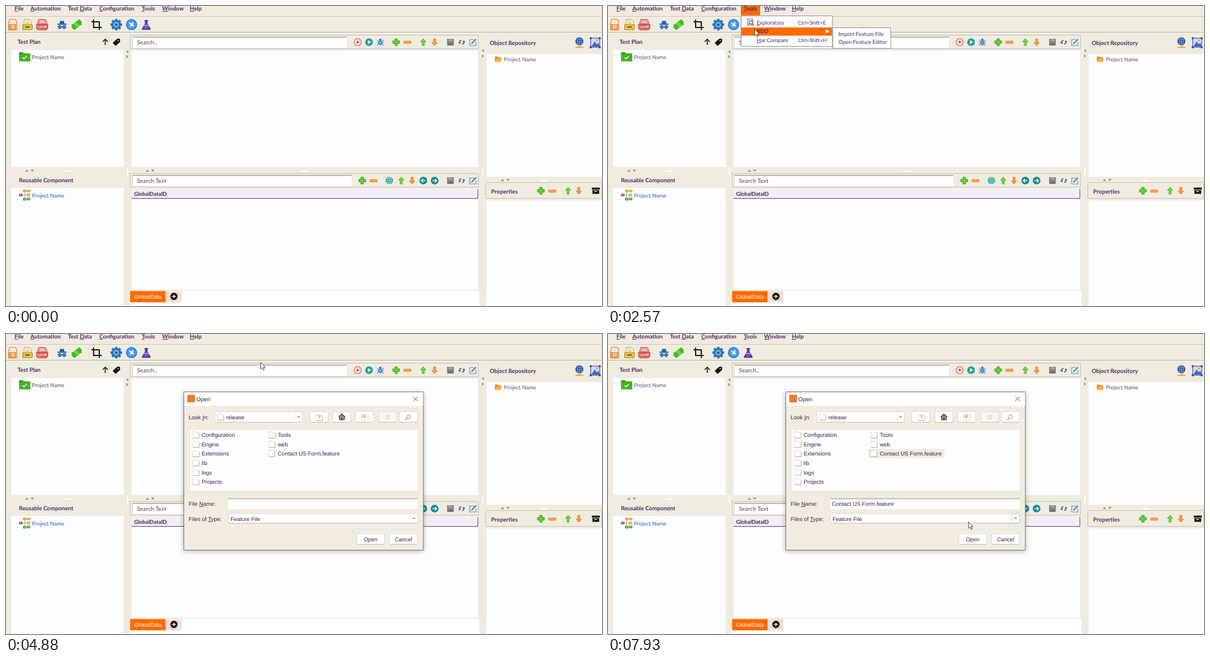
Animation of 1054 by 531 pixels, one loop 8 s. Source, as an HTML page:

```html
<!DOCTYPE html>
<html lang="en">
<head>
<meta charset="utf-8">
<title>Importing a feature file</title>
<style>
html, body { margin: 0; width: 100%; height: 100%; overflow: hidden; background: #f0ebdf; }
svg { display: block; width: 100%; height: 100%; }
text { font-family: Lato, "Open Sans", sans-serif; font-size: 9.6px; fill: #4b2a66; text-rendering: geometricPrecision; white-space: pre; }
.bold { font-weight: 700; font-size: 10.15px; }
.field { font-weight: 500; font-size: 10.3px; fill: #56515c; }
.dlg { font-family: "Liberation Sans", Arial, sans-serif; font-size: 9.87px; fill: #35204f; }
</style>
</head>
<body>
<svg id="stage" viewBox="0 0 1054 531" preserveAspectRatio="none"></svg>
<script>
const LOOP = 8000;
const C = { bg: '#f0ebdf', pane: '#fcfdff', line: '#c3beb2', orange: '#ff6a00', ink: '#4b2a66' };

// ---- drawing helpers ----
const rect = (x, y, w, h, fill, more = '') => `<rect x="${x}" y="${y}" width="${w}" height="${h}" fill="${fill}" ${more}/>`;
const circle = (x, y, r, fill, more = '') => `<circle cx="${x}" cy="${y}" r="${r}" fill="${fill}" ${more}/>`;
const path = (d, fill, more = '') => `<path d="${d}" fill="${fill}" ${more}/>`;
const stroke = (d, color, w = 1, more = '') => path(d, 'none', `stroke="${color}" stroke-width="${w}" ${more}`);
const at = (x, y, body, more = '') => `<g transform="translate(${x} ${y}) ${more}">${body}</g>`;
const group = (id, body) => `<g id="${id}" visibility="hidden">${body}</g>`;
// An underscore marks the underlined letter.
const text = (x, y, s, cls = '', more = '') =>
  `<text x="${x}" y="${y}" class="${cls}" ${more}>${s.replace(/_(.)/, '<tspan text-decoration="underline">$1</tspan>')}</text>`;

// ---- small icons, centred on their position ----
const plus = (x, y) => at(x, y, path('M-2.2-6h4.4v3.8h3.8v4.4h-3.8v3.8h-4.4v-3.8h-3.8v-4.4h3.8z', '#5fd62a', 'stroke="#2f9a1c"'));
const minus = (x, y) => at(x, y, rect(-6.5, -1.8, 13, 4, '#ffa24c', 'rx="1" stroke="#dc7426" stroke-width=".9"'));
const arrow = (x, y, up) => at(x, y, path('M0-6.2 4.8-.8H1.9V6H-1.9V-.8H-4.8Z', up ? '#70dc36' : '#ff9a3c',
  `stroke="${up ? '#3fa822' : '#e07620'}" stroke-width=".9" stroke-linejoin="round"`), up ? '' : 'rotate(180)');
const save = (x, y) => at(x, y, rect(-6, -6, 12, 12, '#85858a', 'rx="1"') + rect(-3.5, -5.5, 7, 4, '#a2a2a6') + rect(-3.5, 1.5, 7, 4, '#6e6e74'));
const refresh = (x, y) => at(x, y,
  stroke('M-3.7 1V-1Q-3.7-3.2-.5-3.2M3.7-1V1Q3.7 3.2 .5 3.2', '#2a68b8', 1.7) +
  path('M-6 0h4.6L-3.7 3.6zM6 0h-4.6L3.7-3.6z', '#2a68b8'));
const edit = (x, y) => at(x, y,
  stroke('M1.5-4.5H-6V6H5V0', '#4c97d4', 1.2) + stroke('M-2 2 5.2-5.2', '#2f80c4', 2) + path('M-3.5 3.5-2.8 .6-.6 2.8Z', '#2f80c4'));
const globe = (x, y, r, color, bg) => at(x, y, circle(0, 0, r, color) +
  stroke(`M${-r} 0H${r}M0 ${-r}V${r}M${-r * .8} ${-r / 2}H${r * .8}M${-r * .8} ${r / 2}H${r * .8}`, bg, .7) +
  `<ellipse rx="${r / 2}" ry="${r}" fill="none" stroke="${bg}" stroke-width=".7"/>`);
const roundArrow = (x, y, turn) => at(x, y, circle(0, 0, 6.8, '#0a8a8f') +
  stroke('M-3.8 0H3M.3-3.2 3.5 0 .3 3.2', '#fff', 1.7), `rotate(${turn})`);
const tri = (x, y, turn, color = '#8f8a80', s = 1) => at(x, y, path('M-3 1.7 0-1.7 3 1.7Z', color), `rotate(${turn}) scale(${s})`);
const tools = y => save(786, y) + refresh(806, y) + edit(826, y);

const box = (x, y, w, h) => rect(x + .5, y + .5, w - 1, h - 1, C.bg, `stroke="${C.line}"`);
const input = (x, y, w, h) => rect(x, y, w, h, '#fff') + rect(x, y, w, 2, '#b9b6b1') + rect(x, y, 1, h, '#d2cfc8');
const grip = (x, y, w, h) => rect(x, y, w, h, '#fff', 'rx="1.5" stroke="#d9d4c8" stroke-width=".5"');

function toolbar() {
  let teeth = '';
  for (let a = 0; a < 360; a += 45) teeth += rect(-2.4, -10.3, 4.8, 5, '#2578b8', `rx="1" transform="rotate(${a})"`);
  return at(12, 33,
      path('M-5.5-9.5H4L7-6V9.5H-7.5V-2Z', '#f8e6d4', 'stroke="#d9803a" stroke-width="1.2"') +
      rect(-7, -1, 13.5, 10, '#ef9a52') + rect(-2.5, 1.2, 5, 5, '#fff', 'rx="1"') + stroke('M0 2v3.4M-1.7 3.7h3.4', '#d66c1c')) +
    at(38, 33,
      path('M-6-9H4L7-6V2H-6Z', '#fff6d0', 'stroke="#a08d4a" stroke-width=".9"') + stroke('M-3-5H3M-3-2H4', '#b49b4a') +
      path('M-8.5 0H8.5V9H-8.5Z', '#f6c235', 'stroke="#8a7430" stroke-width=".9"') + rect(-4, 3, 8, 2.4, '#6f5e28')) +
    at(64, 33,
      path('M-6-9.5H5L8-6V9.5H-8V-4Z', '#e9938e', 'stroke="#cf4f49"') + stroke('M-4-6H3M-4-3.7H5', '#fff') +
      rect(-10.5, -1.5, 21, 9.5, '#d84f49', 'rx="1"') +
      text(0, 5.6, 'GAME', '', 'text-anchor="middle" style="font-size:6px;font-weight:700;fill:#fff"')) +
    at(99, 33,
      path('M-4.5-1.5-3.2-7Q0-5.5 3.2-7L4.5-1.5Z', '#2460a8') + rect(-8.5, -1.8, 17, 2, '#2460a8', 'rx="1"') +
      circle(-4, 4.2, 3, '#3d83d0', 'stroke="#2460a8"') + circle(4, 4.2, 3, '#3d83d0', 'stroke="#2460a8"') + stroke('M-1 3.8H1', '#2460a8', 1.4)) +
    at(125, 33,
      rect(-10, -4.2, 20, 8.4, '#46bd20', 'rx="2"') + rect(-3.6, -5.2, 7.2, 10.4, '#63da38', 'rx="1"') +
      circle(-5.6, -4.4, 2, '#46bd20') + circle(5.6, 4.4, 2, '#46bd20') + stroke('M-3.6-4V4M3.6-4V4', '#2b8f12', .8), 'rotate(-45)') +
    at(160, 33, stroke('M-5-9V5H9.5M-9-5H5V9.5', '#111', 2)) +
    at(195, 33, teeth + circle(0, 0, 7.8, '#2578b8') + circle(0, 0, 4.6, '#8ec8ee') + circle(0, 0, 2.5, '#1c5f98')) +
    at(222, 33, circle(0, 0, 10, '#2f86e4') + circle(0, 0, 7.8, '#4a9bf0') + path('M-5-4 0-2.5 4-5.5 2.8-1 5 4.5 1 2-2.5 4.5-2 0Z', '#eef6ff')) +
    at(248, 34, path('M-2.4-8.5H2.4V-3L7.8 6.3Q8.3 8.3 6.3 8.3H-6.3Q-8.3 8.3-7.8 6.3L-2.4-3Z', '#5a3fa6') +
      rect(-3.5, -9, 7, 1.6, '#40298a', 'rx=".8"') + path('M-3.4-.8H3.4L5 2H-5Z', '#a18be0') + circle(-1.5, 5, 1, '#c9baf2') + circle(2, 4, .8, '#c9baf2'));
}

function leftSide() {
  const nodes = [[0, -7.5, '#e8a01c'], [-7, 0, '#d63a2a'], [7, 0, '#e8a01c'], [0, 7.5, '#3fa52a'], [7, -7, '#e8a01c'], [7, 7, '#3fa52a']];
  return text(20.5, 67, 'Test Plan', 'bold') +
    stroke('M175.5 69V59M171 63.2 175.5 58.7 180 63.2', '#111', 1.5) +
    at(196, 63, path('M-6-2.5H3.5L6.5 0 3.5 3.5H-6Z', '#111', 'stroke="#111" stroke-width="1.6" stroke-linejoin="round"') + circle(3, .3, 1, C.bg), 'rotate(-42)') +
    rect(9, 78, 199, 207, C.pane) +
    path('M23 82h7l2 2h11v14H23z', '#2f9a17') + rect(23, 85, 20, 13, '#45b51f', 'rx="1"') + stroke('M29.5 91 32 93.6 36.8 88.8', '#fff', 1.5) +
    text(46, 93.5, 'Project Name', '', 'style="fill:#634a78"') +
    text(23, 311.5, 'Reusable Component', 'bold') + rect(9, 322, 199, 209, C.pane) +
    at(33, 334.5, stroke('M0-7V7M-7 0H7M0-7H7M0 7H5', '#888', .8) + nodes.map(([x, y, c]) => rect(x - 3, y - 2.3, 6, 4.6, c, 'rx=".8"') +
      rect(x - 1.5, y - .7, 3, 1.3, '#ffffffb0')).join('')) +
    text(46, 338.5, 'Project Name', '', 'style="fill:#3657c4"');
}

function middle() {
  return box(219, 51, 617, 25) + input(223, 54, 380, 20) + text(231.5, 67.5, 'Search..', 'field') +
    circle(622, 64, 6.3, '#fbe9e4', 'stroke="#d8675c" stroke-width="1.3"') + circle(622, 64, 2.2, '#d8544a') +
    circle(642, 64, 6.8, '#1fa39a') + path('M640 60.6 645.6 64 640 67.4Z', '#fff') +
    at(662, 64, stroke('M-6-4-3-1M6-4 3-1M-6.5 1H6.5M-6 6-3 3M6 6 3 3', '#4a90e0', 1.1) +
      '<ellipse cy="1.2" rx="3.6" ry="4.8" fill="#4a90e0"/>' + circle(0, -4.2, 2.2, '#3a7bd0') + stroke('M0-2V6', '#b8d6f8', .7)) +
    plus(690, 64) + minus(710, 64) + arrow(738, 64, true) + arrow(758, 64, false) + tools(64) +
    rect(222, 79, 613, 206, C.pane) +
    box(219, 296, 617, 25) + input(223, 299, 388, 20) + text(231.5, 312.5, 'Search Text', 'field') +
    plus(630, 309) + minus(650, 309) + globe(678, 309, 6.5, '#129a92', '#d8f2ee') + arrow(699, 309, true) + arrow(718, 309, false) +
    roundArrow(738, 309, 180) + roundArrow(758, 309, 0) + tools(309) +
    rect(222, 323, 613, 179, C.pane) + rect(222, 323, 612, 17, '#f2eef6') + stroke('M222 340.5H834.5V324', '#54406f') +
    text(226.5, 335.5, 'GlobalDataID', 'bold', 'style="font-size:9.6px;fill:#3a2450"') +
    rect(219, 504, 618, 27, '#fff') + rect(219.5, 504.5, 62.5, 20, C.orange) + rect(282, 504.5, 28, 20, '#f6ddd3') +
    text(226.5, 518.3, 'GlobalData', 'dlg', 'style="fill:#fff"') +
    circle(297, 514, 6.4, '#0c0c0c') + stroke('M293.5 514h7M297 510.5v7', '#fff', 1.5);
}

function rightSide() {
  return text(855.5, 69, 'Object Repository', 'bold') +
    globe(1014, 62.5, 7.2, '#234f96', '#9cc0ee') + stroke('M1014 69.5V73M1007 73.2H1021', '#e8932a', 1.6) + circle(1014, 73, 2, '#f0a840') +
    at(1042, 65, rect(-8, -8, 16, 16, '#cfdcf8', 'stroke="#4463c0" stroke-width="1.3"') + path('M-7 7-1-2 3 3 5 0 7 3V7Z', '#4c67c4') +
      circle(3, -4, 1.8, '#f0a030') + [[-8, -8], [8, -8], [-8, 8], [8, 8]].map(([x, y]) => rect(x - 1.7, y - 1.7, 3.4, 3.4, '#34489c')).join('')) +
    rect(850, 85, 204, 217, C.pane) +
    path('M864.5 89.5h4.5l1.5 1.5h5v8h-11z', '#e8891a') + path('M866.5 93H877l-1.5 6h-11z', '#ffb340') +
    text(880.5, 97.5, 'Project Name', '', 'style="fill:#634a78"') +
    box(848, 312, 206, 29) + text(858, 331.5, 'Properties', 'bold') +
    plus(946, 327) + minus(966, 327.5) + arrow(994, 327, true) + arrow(1013, 327, false) +
    at(1043, 327, rect(-7, -5.5, 14, 3.5, '#111') + rect(-6, -1, 12, 6.5, '#111') + rect(-2.2, .5, 4.4, 1.5, C.bg)) +
    rect(850, 344, 204, 187, C.pane);
}

const splitters = () =>
  tri(214.5, 81, -90) + tri(214.5, 89.5, 90) + tri(843.5, 79, -90) + tri(843.5, 88.5, 90) +
  [[37, 291.5], [250, 291.5], [878, 308]].map(([x, y]) => tri(x, y, 0) + tri(x + 9.5, y, 180)).join('') +
  grip(101, 290.5, 15, 3.5) + grip(522, 290.5, 14, 3.5) + grip(944, 307.5, 15, 3.5) + grip(213, 285, 3.5, 15) + grip(841.5, 285, 3.5, 15);

const menuBar = () =>
  [[15, '_File'], [43, '_Automation'], [109.5, 'Test _Data'], [165, '_Configuration'], [240, '_Tools'], [276, '_Window'], [325, '_Help']]
    .map(([x, s]) => text(x, 8, s, 'bold')).join('');

function menu() {
  return rect(235.5, 17.5, 161.5, 54, '#fdfdfe', 'stroke="#8d8a88"') +
    group('rowA', rect(236, 22, 160, 15, C.orange)) + group('rowB', rect(236, 38, 160, 14.5, C.orange)) +
    at(252, 29, rect(-5, -6, 9, 11, '#f3f0ea', 'stroke="#6a6670" stroke-width=".9"') + circle(1, 0, 3.2, '#cfe2f4', 'stroke="#4a4450"') +
      stroke('M3.2 2.5 6 5.5', '#b8672c', 1.8) + stroke('M-5 5-2 1', '#b8672c', 1.2)) +
    text(263, 32.8, '_Exploratory') + text(336, 32.8, 'Ctrl+Shift+E', '', 'style="font-size:9.2px"') +
    text(263, 48.3, 'BDD', '', 'font-weight="700"') + tri(388.5, 45, 90, '#6b6570') +
    group('rowArrow', path('M385 41.5 392 45 385 48.5Z', '#fff')) +
    text(263, 63.8, '_Har Compare') + text(336, 63.8, 'Ctrl+Shift+H', '', 'style="font-size:9.2px"');
}

const submenu = () => rect(397.5, 38.5, 102.5, 36.5, '#fdfdfe', 'stroke="#8d8a88"') +
  group('rowImport', rect(398, 42, 101, 14, C.orange)) +
  text(407.5, 52.5, 'Import Feature File') + text(407.5, 67.3, 'Open Feature Editor');

// ---- file dialog ----
const button = (x, y, w, h, fill = '#fff') => rect(x + .5, y + 1.2, w - 1, h - .6, '#bdb8ae', 'rx="3"') +
  rect(x + .5, y + .5, w - 1, h - 1, fill, 'rx="3" stroke="#d6d1c7" stroke-width=".8"');
// Pale sheet with a darker lower right edge.
const sheet = d => path(d, '#fff', 'stroke="#cfcbc8" stroke-width=".8" stroke-linejoin="round"');
const edge = (x, y, w, h) => stroke(`M${x} ${y + h}h${w}v${-h + 2}`, '#a5a19f', .8);
const folder = (x, y) => sheet(`M${x} ${y - 5.5}h5.5l1.5 1.5h4.5v9.5h-11.5z`) + edge(x + .5, y - 4.5, 11, 10);
const file = (x, y) => sheet(`M${x} ${y - 6}h10.5v11.5h-10.5z`) + edge(x + .5, y - 6, 10, 11.5);

function dialog() {
  const rowY = i => 178.7 + i * 16.55;
  const row = (x, s, i, icon) => icon(x, rowY(i)) + text(x + 16, rowY(i) + 3.6, s, 'dlg');
  const list = (x, names) => names.map((s, i) => row(x, s, i, folder)).join('');
  return rect(314, 102, 424, 280, '#fff', 'style="filter:drop-shadow(0 2px 4px #0005)"') +
    rect(314.5, 102.5, 423.5, 280, '#f1ecdf', 'stroke="#77736e"') + rect(315, 103, 422.5, 24, '#fff') +
    rect(320.5, 107.5, 13.5, 13.5, '#ee7a2a') + text(336.5, 118.7, 'Open', 'dlg', 'style="font-size:10.2px;fill:#222"') +
    stroke('M720 110.5l8.5 8.5M728.5 110.5l-8.5 8.5', '#444', .9) +
    text(323, 151, 'Look _In:', 'dlg') + button(369, 137, 156, 19.5) + folder(373.5, 147) + text(389.5, 151, 'release', 'dlg') +
    stroke('M511.5 139v16', '#ebe8e2') + tri(517.5, 147, 180, '#8a8580', .9) +
    [537, 577.5, 618, 695.5].map(x => button(x, 137, 33, 19.5)).join('') + button(658.5, 137, 33, 19.5, '#f8f6f2') +
    at(553.5, 147, folder(-5.5, 1) + path('M1-5 5-1H2.5V3H-.5V-1H-3Z', '#f9c795')) +
    at(594, 146.5, path('M-7 .5 0-6 7 .5H5V6H-5V.5Z', '#5b4c58') + path('M-3.5 5V0L0-3 3.5 0V5Z', '#a8969c') + rect(-1.2, 1, 2.4, 5, '#5b3840')) +
    at(634.5, 147, sheet('M-6-5H6V6H-6Z') + stroke('M-1-5V3M-5-1H3M-4-4 2 2M-4 2 2-4', '#f4a050', 1)) +
    at(675, 147, stroke('M-3.5-3h3M-3.5 0h3M-3.5 3h3M1-3h2.5M1 0h2.5M1 3h2.5', '#a5a0a2', 1.1)) +
    at(711, 147, circle(1, -.5, 3.4, '#f2f6fa', 'stroke="#8f8b92" stroke-width=".9"') + stroke('M-1.7 2.2-5 5.3', '#8f8b92', 1.3)) +
    rect(325, 170, 403, 107, '#fbfdff') +
    group('picked', rect(460, 203.5, 135, 16, '#f1ecdf')) +
    list(330, ['Configuration', 'Engine', 'Extensions', 'lib', 'logs', 'Projects']) + list(464.7, ['Tools', 'web']) +
    row(464.7, 'Contact US Form.feature', 2, file) +
    text(323, 304, 'File _Name:', 'dlg') + rect(393, 291, 335, 19, '#fff') + rect(393, 290.5, 335, 2, '#bcb8b3') +
    group('fileName', text(396, 304, 'Contact US Form.feature', 'dlg')) +
    text(323, 330.5, 'Files of _Type:', 'dlg') + button(393, 317.5, 335.5, 17.5) + text(397, 330.5, 'Feature File', 'dlg') +
    stroke('M714.5 319v15', '#ebe8e2') + tri(721, 326.5, 180, '#8a8580', .9) +
    group('comboHover', stroke('M714.5 318.5h12q1.5 0 1.5 1.5v13q0 1.5-1.5 1.5h-12z', '#c8c3b9', .8)) +
    button(620, 353, 50, 19.5) + text(645, 366.8, 'Open', 'dlg', 'text-anchor="middle"') +
    button(678, 353, 50, 19.5) + text(703, 366.8, 'Cancel', 'dlg', 'text-anchor="middle"');
}

document.getElementById('stage').innerHTML =
  rect(0, 0, 1054, 531, C.bg) +
  stroke('M0 18.5H1054', '#c2bdb1') + stroke('M0 19.5H1054', '#faf7f0') + stroke('M0 46.5H1054', '#aea99e') + stroke('M0 47.5H1054', '#f8f5ee') +
  group('toolsOn', rect(235, 0, 34, 16.5, C.orange)) +
  menuBar() + toolbar() + leftSide() + middle() + rightSide() + splitters() +
  group('menu', menu()) + group('submenu', submenu()) + group('dialog', dialog()) +
  group('click', circle(0, 0, 10, '#ffff00', 'fill-opacity=".47"')) +
  group('cursor', path('M.5 .5V12L3.2 9.6 5.2 14 7 13.1 5 8.9H8.7Z', '#fff', 'stroke="#3a3640" stroke-width=".9" stroke-linejoin="round"'));

// ---- motion ----
// Each move: start, end, number of steps, points passed at even intervals.
const moves = [
  [460, 1230, 12, [[957, 515], [740, 310], [500, 125], [325, 30], [250, 1]]],
  [1300, 1430, 2, [[250, 2], [250, 4]]],
  [1570, 1640, 2, [[250, 4.5], [250, 5]]],
  [2230, 2370, 3, [[252, 17], [259, 41]]],
  [2770, 2970, 4, [[295, 43], [450, 43]]],
  [3550, 3630, 2, [[450, 46], [450, 50]]],
  [5260, 6040, 12, [[447, 60], [426, 150], [432, 245], [464, 267], [500, 222]]],
  [6120, 6250, 3, [[503, 217], [505, 209]]],
  [6650, 6910, 5, [[507, 210], [533, 219]]],
  [6980, 7400, 6, [[541, 219], [560, 215], [569, 211], [561, 209]]],
  [7470, 7470, 1, [[554, 209]]],
  [7800, 7930, 3, [[580, 245], [637, 332]]]
];

function along(pts, u) {
  const last = pts.length - 1, i = Math.min(Math.floor(u * last), Math.max(last - 1, 0)), f = u * last - i;
  const p = k => pts[Math.max(0, Math.min(last, k))];
  const [a, b, c, d] = [p(i - 1), p(i), p(i + 1), p(i + 2)];
  if (last < 2) return [0, 1].map(k => b[k] + (c[k] - b[k]) * f);
  return [0, 1].map(k => b[k] + .5 * f * (c[k] - a[k] + f * (2 * a[k] - 5 * b[k] + 4 * c[k] - d[k] + f * (3 * (b[k] - c[k]) + d[k] - a[k]))));
}

function pointer(t) {
  const move = moves.filter(m => m[0] <= t).pop();
  if (!move) return null;
  const [start, end, n, pts] = move;
  if (n < 2) return pts[0];
  const step = Math.min(n - 1, Math.floor((t - start) / (end - start) * (n - 1) + 1e-6));
  return along(pts, step / (n - 1)).map(Math.round);
}

const $ = id => document.getElementById(id);
const show = (id, on) => on ? $(id).removeAttribute('display') : $(id).setAttribute('display', 'none');
const place = (id, x, y) => $(id).setAttribute('transform', `translate(${x} ${y})`);
const between = (v, a, b) => v >= a && v < b;
document.querySelectorAll('[visibility]').forEach(g => g.removeAttribute('visibility'));

function draw(t) {
  const pos = pointer(t), [x, y] = pos || [-50, -50];
  const open = between(t, 1780, 4810), sub = between(t, 2570, 4810), files = t >= 4880;
  const onB = open && (sub || between(y, 38, 53));
  show('toolsOn', open);
  show('menu', open);
  show('rowA', open && !sub && between(y, 22, 38));
  show('rowB', onB);
  show('rowArrow', onB);
  show('submenu', sub);
  show('rowImport', sub && x > 398 && between(y, 42, 57));
  show('dialog', files);
  show('picked', t >= 6510);
  show('fileName', t >= 6650);
  show('comboHover', files && between(x, 393, 728) && between(y, 318, 335));
  show('cursor', !!pos);
  show('click', [[1780, 1910], [4080, 4210], [6510, 6650]].some(([a, b]) => between(t, a, b)));
  place('cursor', x, y);
  place('click', x, y);
}

const began = performance.now();
function tick() {
  draw((performance.now() - began) % LOOP);
  requestAnimationFrame(tick);
}
tick();
</script>
</body>
</html>
```
